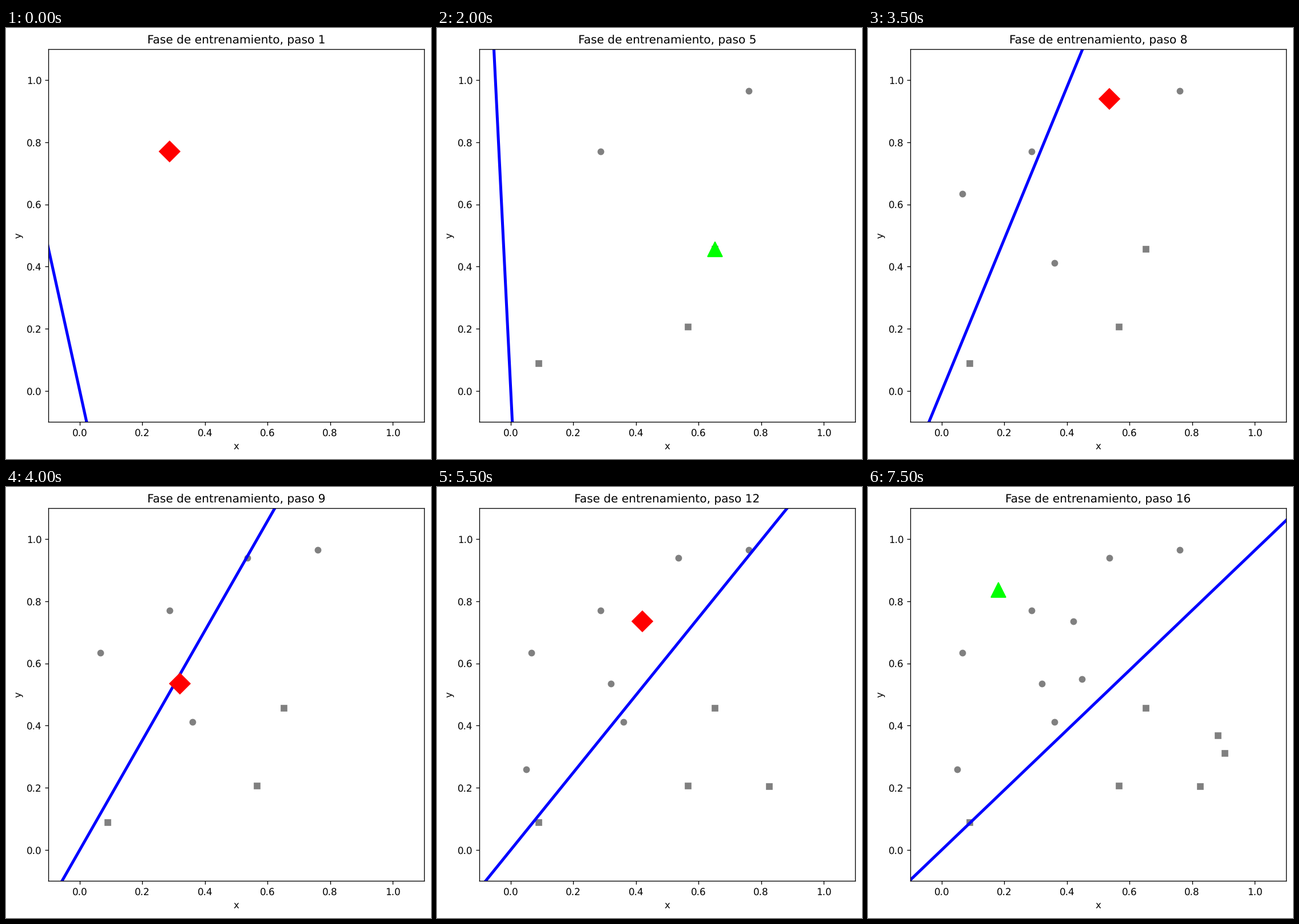
Write a matplotlib script that moves like this. It is 743 px wide and 754 px high and loops after 8 s.

```python
import matplotlib.pyplot as plt
from matplotlib.animation import FuncAnimation

W, H, DPI = 743, 754, 121
LEFT, TOP, AX_W, AX_H = 74.25, 37, 656.5, 652.2
STEP_MS = 500

# Training samples in order of presentation: x, y, marker by class
SAMPLES = [
    (0.2873, 0.7715, "o"), (0.7613, 0.9656, "o"),
    (0.0900, 0.0877, "s"), (0.5667, 0.2055, "s"),
    (0.6534, 0.4568, "s"), (0.0662, 0.6344, "o"),
    (0.3603, 0.4117, "o"), (0.5365, 0.9399, "o"),
    (0.3201, 0.5359, "o"), (0.0498, 0.2589, "o"),
    (0.8261, 0.2037, "s"), (0.4197, 0.7365, "o"),
    (0.4470, 0.5497, "o"), (0.9046, 0.3114, "s"),
    (0.8827, 0.3675, "s"), (0.1804, 0.8360, "o"),
]

# Steps with a wrong guess, and the x/y ratio of the boundary after correction
UPDATES = {1: -0.2185, 2: -0.049, 6: 0.082, 7: 0.1762, 8: 0.409,
           9: 0.5667, 12: 0.803, 13: 1.0375}

plt.rcParams.update({"font.family": "DejaVu Sans", "text.hinting": "none"})
fig = plt.figure(figsize=(W / DPI, H / DPI), dpi=DPI, facecolor="white")
ax = fig.add_axes([LEFT / W, 1 - (TOP + AX_H) / H, AX_W / W, AX_H / H])
ax.set(xlim=(-0.1, 1.1), ylim=(-0.1, 1.1), xlabel="x", ylabel="y")
title = ax.set_title("")

seen = {m: ax.plot([], [], m, color="gray")[0] for m in "os"}
boundary, = ax.plot([], [], color="blue", lw=3)
miss, = ax.plot([], [], "D", color="red", ms=15)
hit, = ax.plot([], [], "^", color="lime", ms=15)


def draw(i):
    step = i + 1
    title.set_text(f"Fase de entrenamiento, paso {step}")

    for marker, dots in seen.items():
        pts = [(x, y) for x, y, m in SAMPLES[:step] if m == marker]
        dots.set_data([p[0] for p in pts], [p[1] for p in pts])

    ratio = UPDATES[max(s for s in UPDATES if s <= step)]
    boundary.set_data([-2 * ratio, 2 * ratio], [-2, 2])

    x, y, _ = SAMPLES[i]
    wrong = step in UPDATES
    current, other = (miss, hit) if wrong else (hit, miss)
    current.set_data([x], [y])
    other.set_data([], [])
    return title, *seen.values(), boundary, miss, hit


anim = FuncAnimation(fig, draw, frames=len(SAMPLES), interval=STEP_MS,
                     repeat=True, repeat_delay=0, blit=False)
plt.show()
```
